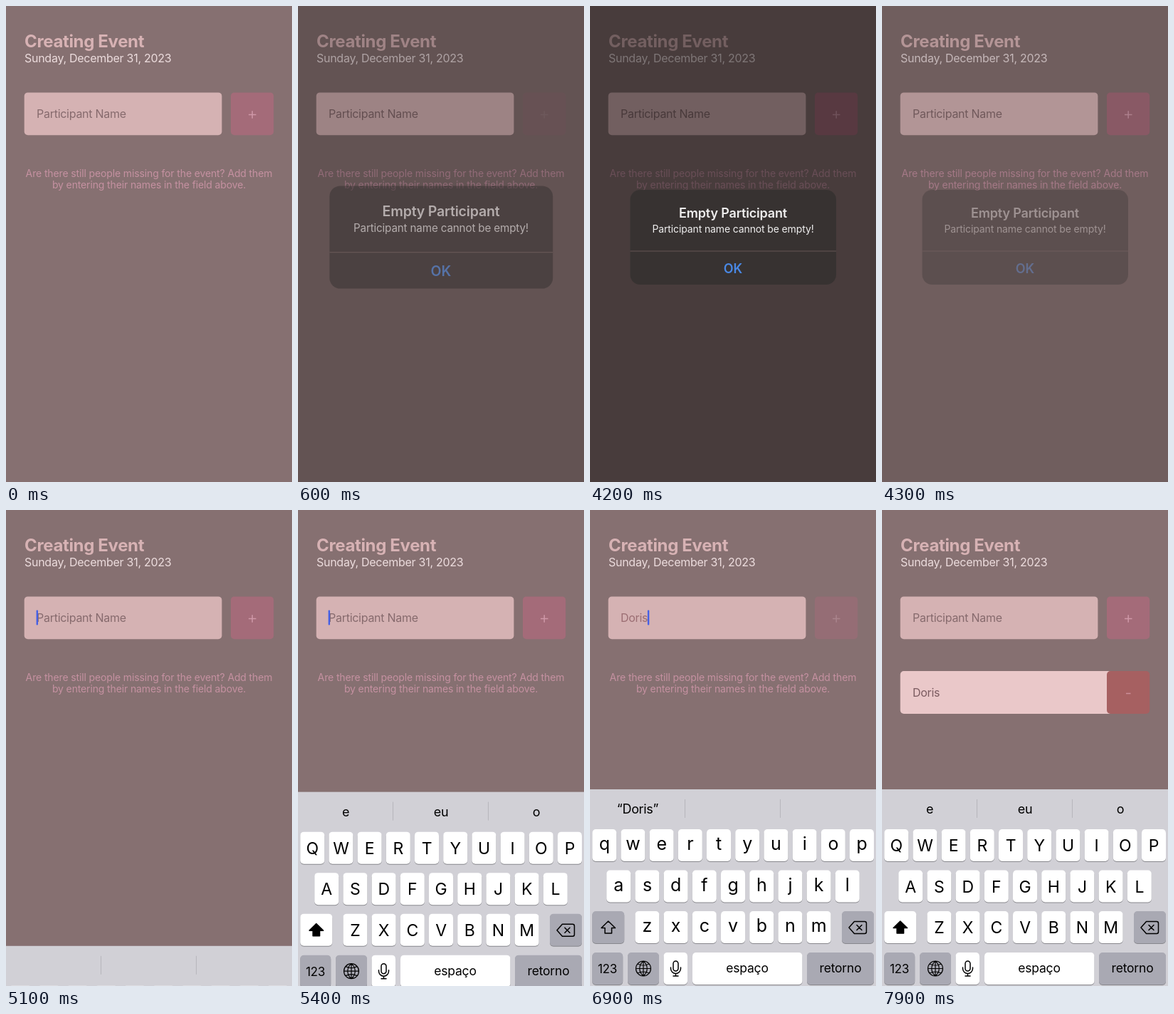
These frames come from a looping animation (402 px wide and 668 px high, 8000 ms). An HTML page:

```html
<!DOCTYPE html>
<html lang="en">
<head>
<meta charset="utf-8">
<title>Creating Event</title>
<style>
  html, body { margin: 0; width: 100%; height: 100%; overflow: hidden; background: #867071; }
  svg { display: block; font-family: Inter, Roboto, sans-serif; }
  .mid { text-anchor: middle; }
  .body { font-size: 16px; letter-spacing: -.27px; }
  .help { font-size: 14px; letter-spacing: -.13px; fill: #c591a1; }
  .sugg { font-size: 18px; letter-spacing: -.3px; }
  .line { fill: none; stroke: #000; stroke-width: 1.5; stroke-linecap: round; stroke-linejoin: round; }
</style>
</head>
<body>
<svg id="stage" width="402" height="668" viewBox="0 0 402 668">
  <rect width="402" height="668" fill="#867071"/>
  <text x="26" y="58" font-size="24" font-weight="700" letter-spacing="-.35" fill="#d7b2b4">Creating Event</text>
  <text x="26" y="79" class="body" fill="#ecdcdd">Sunday, December 31, 2023</text>

  <rect x="25.7" y="121.4" width="277.7" height="59.8" rx="5" fill="#d5b2b3"/>
  <text id="field" x="43" y="157" class="body"></text>
  <rect id="caret" y="140.5" width="2.4" height="21" rx="1" fill="#4560e6"/>
  <g id="plus">
    <rect x="316" y="121.4" width="60.2" height="59.8" rx="5" fill="#a46b79"/>
    <path d="M341 152.5h10.5M346.2 147.2v10.5" stroke="#cf98a8" stroke-width="1.5"/>
  </g>

  <g id="help" class="help mid">
    <text x="201" y="240">Are there still people missing for the event? Add them</text>
    <text x="201" y="256">by entering their names in the field above.</text>
  </g>
  <g id="item">
    <rect x="25.7" y="226" width="320" height="60" rx="5" fill="#eac8c9"/>
    <text x="43" y="261.5" class="body" fill="#7b5b60">Doris</text>
    <rect x="316" y="226" width="60.2" height="60" rx="5" fill="#a66061"/>
    <path d="M343 257.5h6.5" stroke="#cb8f99" stroke-width="1.5"/>
  </g>

  <rect id="dim" width="402" height="668"/>
  <g id="alert" class="mid">
    <rect x="56.5" y="258" width="289.5" height="133" rx="14" fill="#363231"/>
    <path d="M56.5 344h289.5" stroke="#685756"/>
    <text x="201" y="297" font-size="18" font-weight="600" letter-spacing="-.17" fill="#fff">Empty Participant</text>
    <text x="201" y="318" font-size="14" letter-spacing="-.13" fill="#fff">Participant name cannot be empty!</text>
    <text x="201" y="374.5" font-size="18" font-weight="600" fill="#4a90f5">OK</text>
  </g>

  <g id="board">
    <rect y="392" width="402" height="290" fill="#d1d0d6"/>
    <path id="bars" d="M133.5 406v26M267.5 406v26" stroke="#b7b6bc"/>
    <rect id="pick" x="134" y="399" width="134" height="40" rx="5" fill="#e9e9ee"/>
    <g id="suggs"></g>
    <g id="keys"></g>
    <g id="pop">
      <path fill="#fff" style="filter:drop-shadow(0 1px 2px #0006)"
        d="M-23 -70H23Q31 -70 31 -62V-26Q31 -18 25 -12Q17 -4 17 4V40Q17 45 12 45H-12Q-17 45 -17 40V4Q-17 -4 -25 -12Q-31 -18 -31 -26V-62Q-31 -70 -23 -70Z"/>
      <text id="popText" y="-25" class="mid" font-size="39" font-weight="300"></text>
    </g>
  </g>
</svg>
<script>
const LOOP = 8000, STEP = 100;
const $ = id => document.getElementById(id);

function add(parent, tag, attrs, text = '') {
  const el = document.createElementNS('http://www.w3.org/2000/svg', tag);
  for (const k in attrs) el.setAttribute(k, attrs[k]);
  el.textContent = text;
  parent.append(el);
  return el;
}

const GREY = '#a9a9b3';
const keys = $('keys');

function key(x, y, w, fill = '#fff') {
  add(keys, 'rect', { x, y: y + 1, width: w, height: 45, rx: 5, fill: '#88888d' });
  return add(keys, 'rect', { x, y, width: w, height: 45, rx: 5, fill });
}

function label(x, y, size, text) {
  return add(keys, 'text', { x, y, 'font-size': size, class: 'mid', 'letter-spacing': -.2 }, text);
}

function icon(d) {
  return add(keys, 'path', { d, class: 'line' });
}

const letters = {};
[['qwertyuiop', 3.2, 448], ['asdfghjkl', 23.2, 505.5], ['zxcvbnm', 63.4, 563]].forEach(([row, x0, y]) => {
  [...row].forEach((ch, i) => {
    const x = x0 + i * 40.2;
    key(x, y, 34);
    letters[ch] = { x: x + 17, y, el: label(x + 17, y + 30, 25, ch) };
  });
});

const shift = key(3.2, 563, 45);
const arrow = icon('M25.7 577L35.5 586.5H30.5V594H21V586.5H16Z');
key(354, 563, 45, GREY);
icon('M364 586L371.5 577.5H386Q388.5 577.5 388.5 580V592Q388.5 594.5 386 594.5H371.5ZM375 582.5l7 7m0-7l-7 7');
key(3.2, 621, 43, GREY);
label(24.5, 650, 17, '123');
key(53, 621, 44, GREY);
icon('M64.5 643.5a10.5 10.5 0 1 0 21 0a10.5 10.5 0 1 0-21 0M64.5 643.5h21M75 633v21M75 633c-7 6-7 15 0 21c7-6 7-15 0-21M67 637q8 4 16 0M67 650q8-4 16 0')
  .style.strokeWidth = 1.2;
key(103.5, 621, 33.5);
icon('M117 636.5a3.5 3.5 0 0 1 7 0v7a3.5 3.5 0 0 1-7 0ZM113.5 642v1.5a7 7 0 0 0 14 0v-1.5M120.5 651v3M117 654h7');
key(144, 621, 154.5);
label(221, 649, 17.5, 'espaço');
key(305, 621, 94, GREY);
label(352, 649, 17.5, 'retorno');

const suggs = [67, 201, 335].map(x => add($('suggs'), 'text', { x, y: 426, class: 'sugg mid' }));

// Each table holds [start time, value] rows; the last row reached applies.
const TYPED = [[0, ''], [5800, 'D'], [6000, 'Do'], [6200, 'Dor'], [6400, 'Dori'], [6600, 'Doris'], [7000, '']];
const POPUP = [[0, ''], [5800, 'd'], [5900, ''], [6000, 'o'], [6100, ''], [6200, 'r'], [6300, ''],
  [6400, 'i'], [6500, ''], [6600, 's'], [6700, '']];
const HINTS = [[0, []], [5300, ['e', 'eu', 'o']], [6000, ['“D”']], [6100, ['“Do”', 'Na']], [6300, ['“Dor”']],
  [6500, ['“Dori”']], [6800, ['“Doris”']], [7000, ['e', 'eu', 'o']]];
const PRESS = [[0, 1], [500, .5], [600, .2], [700, .35], [800, .75], [900, 1],
  [6900, .5], [7000, .2], [7100, .35], [7200, .75], [7300, 1]];
const CARET = [[0, 0], [5100, 1], [7800, .4], [7900, 0]];

const at = (table, t) => table.findLast(row => row[0] <= t)[1];

// Remaining distance of a critically damped spring, 1 to 0.
function rest(ms) {
  const x = Math.max(0, ms) * .01826;
  return (1 + x) * Math.exp(-x);
}

const show = (el, on) => el.style.display = on ? '' : 'none';

function draw(t) {
  const open = rest(t - 505);
  const alpha = t < 500 || t >= 4500 ? 0 : (1 - open) * rest(t - 4173);
  $('dim').setAttribute('opacity', .51 * alpha);
  $('alert').setAttribute('opacity', alpha);
  $('alert').setAttribute('transform', `translate(201 324.5) scale(${1 + .175 * open}) translate(-201 -324.5)`);

  const text = at(TYPED, t), field = $('field');
  field.textContent = text || 'Participant Name';
  field.setAttribute('fill', text ? '#9b6e73' : '#866a6d');
  $('caret').setAttribute('x', 42.6 + (text ? field.getComputedTextLength() : 0));
  $('caret').setAttribute('opacity', at(CARET, t));
  $('plus').setAttribute('opacity', at(PRESS, t));
  show($('item'), t >= 7000);
  show($('help'), t < 7000);

  show($('board'), t >= 5100);
  $('board').setAttribute('transform', `translate(0 ${276 * rest(t - 5054.3)})`);

  const caps = t < 5900 || t >= 7000;
  for (const ch in letters) {
    const { el, y } = letters[ch];
    el.textContent = caps ? ch.toUpperCase() : ch;
    el.setAttribute('y', y + (caps ? 31 : 29));
    el.setAttribute('font-size', caps ? 23 : 25);
  }
  shift.setAttribute('fill', caps ? '#fff' : GREY);
  arrow.style.fill = caps ? '#000' : 'none';

  const hints = at(HINTS, t);
  suggs.forEach((el, i) => el.textContent = hints[i] || '');
  show($('pick'), hints[1] === 'Na');

  const down = letters[at(POPUP, t)];
  show($('pop'), down);
  if (down) {
    $('pop').setAttribute('transform', `translate(${down.x} ${down.y})`);
    $('popText').textContent = down.el.textContent;
  }
}

const start = performance.now();
function tick() {
  const t = (performance.now() - start) % LOOP;
  draw(Math.floor(t / STEP) * STEP);
  requestAnimationFrame(tick);
}
tick();
</script>
</body>
</html>
```
